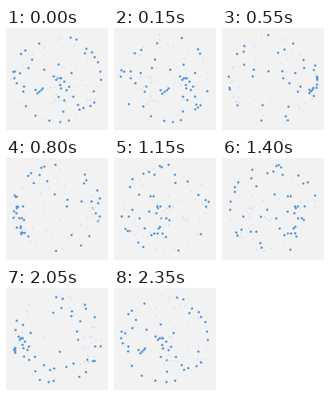
An HTML page with a canvas for the animation above (2400 ms loop, 128 px wide and 128 px high).

```html
<!DOCTYPE html>
<html>
<head>
<meta charset="utf-8">
<style>
  html, body { margin: 0; height: 100%; overflow: hidden; background: #f2f2f2; }
  canvas { display: block; width: 128px; height: 128px; }
</style>
</head>
<body>
<canvas id="stage" width="128" height="128"></canvas>
<script>
const ctx = document.getElementById('stage').getContext('2d');
const LOOP = 2400, STEP = 50, CENTER = 64, RADIUS = 55.5, DEPTH = 0.07;

// Longitudes in degrees of the dots on each latitude, 2px apart from the top.
const latitudes = [
  [-135], [165], [50, 177], [68], [], [151], [-38, 139], [168, -154], [],
  [60, 111], [-64], [76, -135], [-75, 47, -157], [], [73, 126], [], [-36],
  [85], [], [2, 152, -123], [169, 173], [-39], [-16, -107], [-88, -71, 78],
  [-54, 18], [], [-4, 178, -178, -167, -108], [-70, 1, 4, 5, 179],
  [79, -1, 143], [9, 168], [-62, 177], [4], [-46, 15, 110, 135],
  [5, -18, -177, -171, 154], [12, -28, -20, -167], [-49, 56, -23], [-26], [],
  [22, 2, -179], [159, 179], [10, 100], [117, 126], [77, 172, 177, -176],
  [33, 167, -98], [-58, 67, -171], [48], [41], [11], [126], [], [-54], [122],
  [], [-25, 42, -123], [14]
];

const dots = latitudes.flatMap((row, i) => {
  const y = 2 * i - 55;
  const ring = Math.sqrt(RADIUS ** 2 - y ** 2);
  return row.map(lon => ({ y, ring, lon: lon * Math.PI / 180 }));
});

function drawDot({ y, ring, lon }, spin) {
  const x = ring * Math.sin(lon + spin);
  const z = ring * Math.cos(lon + spin) / RADIUS;
  const scale = 1 / (1 - DEPTH * z);
  const front = z > 0;
  ctx.fillStyle = front ? '#5598de' : '#d3dae5';
  ctx.beginPath();
  ctx.arc(CENTER + x * scale, CENTER + y * scale, front ? 1.5 : 0.9, 0, 2 * Math.PI);
  ctx.fill();
}

function draw(now) {
  const time = Math.floor(now % LOOP / STEP) * STEP;
  const spin = time / LOOP * 2 * Math.PI;
  ctx.fillStyle = '#f2f2f2';
  ctx.fillRect(0, 0, 128, 128);
  dots.forEach(dot => drawDot(dot, spin));
  requestAnimationFrame(draw);
}
draw(0);
</script>
</body>
</html>
```
